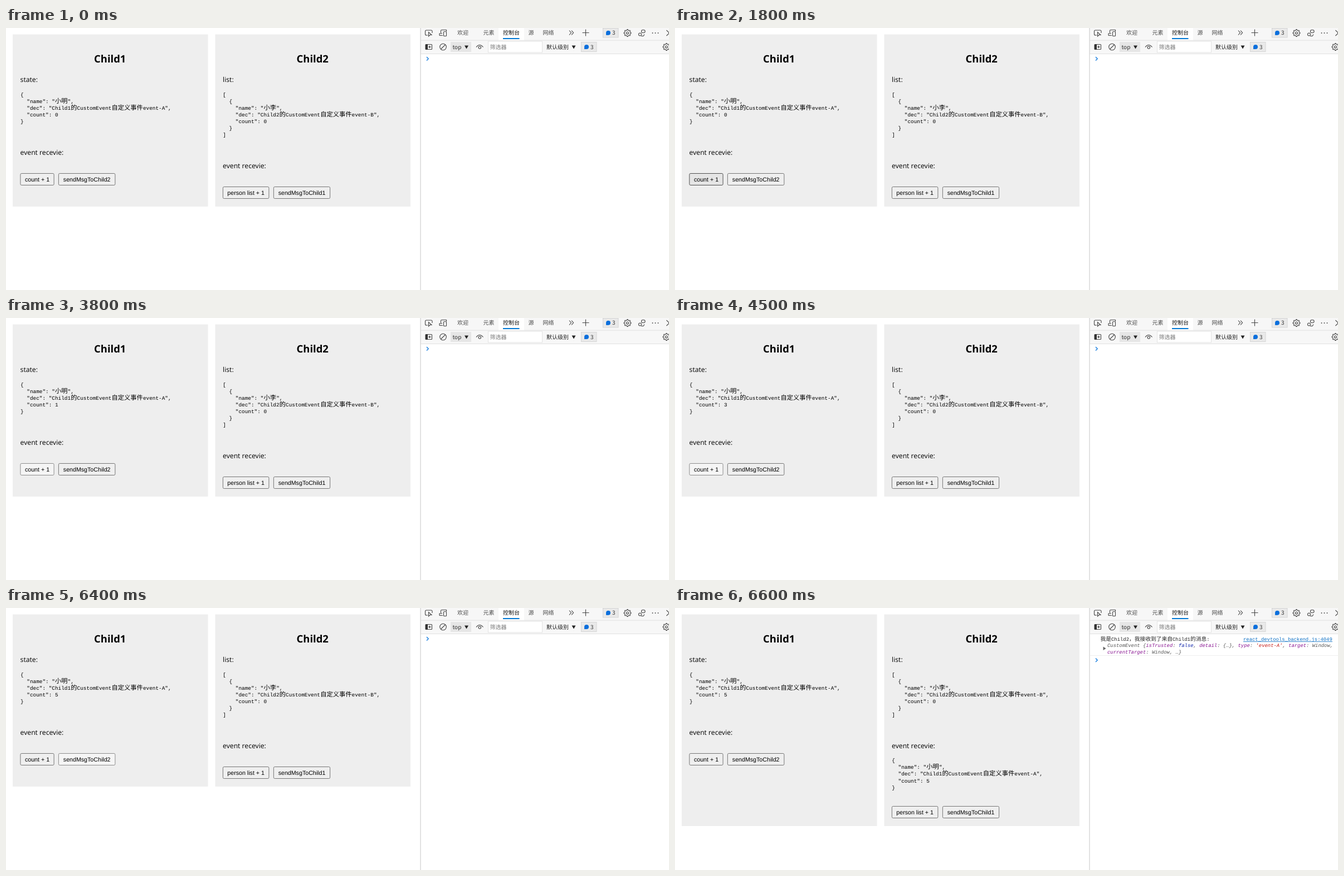
An HTML page for the animation above (8000 ms loop, 1190x471 px).

```html
<!DOCTYPE html>
<html lang="zh-CN">
<head>
<meta charset="utf-8">
<title>CustomEvent demo</title>
<style>
  html, body { margin: 0; width: 100%; height: 100%; overflow: hidden; background: #fff; }
  svg { display: block; width: 1190px; height: 471px; }
  text { white-space: pre; text-rendering: geometricPrecision; }
  .body { font: 12.2px "Open Sans", "Noto Sans", sans-serif; }
  .title { font: 700 18.4px "Open Sans", "Noto Sans", sans-serif; text-anchor: middle; }
  .button { font: 10.67px "Liberation Sans", Arial, sans-serif; text-anchor: middle; }
  .mono { font-family: "Liberation Mono", monospace; }
  .cjk { font-family: "Noto Sans CJK SC", "Noto Sans CJK", sans-serif; }
  .ui { font: 10px "Noto Sans CJK SC", "Noto Sans CJK", sans-serif; fill: #4b4b4b; }
  .icon { fill: none; stroke: #444; stroke-width: 1.1; }
</style>
</head>
<body>
<svg id="stage" viewBox="0 0 1190 471" xmlns="http://www.w3.org/2000/svg"></svg>
<script>
const LOOP = 8000;
const stage = document.getElementById('stage');

function add(tag, attrs, parent = stage, content) {
  const node = document.createElementNS('http://www.w3.org/2000/svg', tag);
  for (const key in attrs) node.setAttribute(key, attrs[key]);
  if (content !== undefined) node.textContent = content;
  return parent.appendChild(node);
}
const group = (parent = stage) => add('g', {}, parent);
const rect = (x, y, width, height, fill, parent, extra) =>
  add('rect', { x, y, width, height, fill, ...extra }, parent);
const path = (d, attrs = { class: 'icon' }, parent) => add('path', { d, ...attrs }, parent);
const label = (cls, x, y, text, parent, extra) =>
  add('text', { class: cls, x, y, ...extra }, parent, text);

// Monospaced text on a column grid; wide characters take their own advance.
function mono(x, y, text, unit, wide, parent, extra = {}) {
  const node = add('text', { y, ...extra }, parent);
  for (const run of text.match(/[\u3000-\uffef]+|[^\u3000-\uffef]+/g)) {
    const isWide = /[\u3000-\uffef]/.test(run);
    add('tspan', {
      x, class: isWide ? 'cjk' : 'mono', 'font-size': isWide ? wide : unit / 0.6
    }, node, run);
    x += run.length * (isWide ? wide : unit);
  }
  return x;
}

function json(x, y, value, parent) {
  JSON.stringify(value, null, 2).split('\n').forEach((line, i) =>
    mono(x, y + i * 12.1, line, 5.64, 11.28, parent));
}

const person = (name, child, event, count) =>
  ({ name, dec: `Child${child}的CustomEvent自定义事件event-${event}`, count });

function button(x, y, width, text, parent) {
  const box = rect(x + 0.4, y + 0.5, width - 0.8, 21, '#efefef', parent, { rx: 2 });
  label('button', x + width / 2, y + 14.6, text, parent);
  return box;
}

function panel(x, title, caption, receiveY) {
  const box = rect(x, 11.5, 350.5, 309.5, '#eee');
  label('title', x + 174.7, 62, title);
  label('body', x + 13.6, 97, caption);
  label('body', x + 13.6, receiveY, 'event recevie:');
  return box;
}

// Page
rect(0, 0, 1190, 471, '#fff');
const panels = [panel(12, 'Child1', 'state:', 228), panel(375.5, 'Child2', 'list:', 252)];
const counter = [0, 1, 2, 3, 4, 5].map(n => {
  const g = group();
  json(26, 122.6, person('小明', 1, 'A', n), g);
  return g;
});
json(389.3, 122.6, [person('小李', 2, 'B', 0)]);
const received = group();
json(389.3, 277.2, person('小明', 1, 'A', 5), received);
const lowerButtons = group();
const buttons = {
  count: button(25.5, 261, 61, 'count + 1'),
  send2: button(94, 261, 102.3, 'sendMsgToChild2'),
  person: button(389, 285, 83.3, 'person list + 1', lowerButtons),
  send1: button(480, 285, 102, 'sendMsgToChild1', lowerButtons)
};

// Developer tools
rect(744, 0, 446, 46, '#f7f7f7');
rect(743.5, 0, 1, 471, '#c6c6c6');
rect(744, 21.7, 446, 0.8, '#dadada');
rect(744, 46, 446, 0.8, '#dadada');
rect(884, 0, 46, 21.7, '#fff');
rect(892, 18, 29.5, 2, '#0078d4');
[[810, '欢迎'], [856.5, '元素'], [892, '控制台'], [937.5, '源'], [963.5, '网络']]
  .forEach(([x, text]) => label('ui', x, 12.4, text, stage, x === 892 ? { style: 'fill:#111' } : {}));

function gear(cx, cy) {
  let d = '';
  for (let i = 0; i < 32; i++) {
    const a = (i - 0.5) * Math.PI / 16;
    const r = i % 4 < 2 ? 6.4 : 4.9;
    d += `${i ? 'L' : 'M'}${(cx + r * Math.cos(a)).toFixed(2)} ${(cy + r * Math.sin(a)).toFixed(2)}`;
  }
  path(d + 'Z');
  add('circle', { class: 'icon', cx, cy, r: 2 });
}
function badge(x, y, height) {
  rect(x + 0.5, y + 0.5, 27.5, height, '#e9e9e9', stage, { stroke: '#d0d0d0', 'stroke-width': 0.8 });
  const cy = y + 0.5 + height / 2;
  add('circle', { cx: x + 10, cy, r: 4, fill: '#0b6fdc' });
  path(`M${x + 6} ${cy}v4h4z`, { fill: '#0b6fdc' });
  label('ui', x + 17, cy + 3.6, '3', stage, { style: 'fill:#333' });
}

path('M757 13h-2.5q-2 0-2-2v-5q0-2 2-2h8.500q2 0 2 2v3M758.500 7.500v7.300l2.300-2.300h3.200z');
path('M780.500 9V5q0-1.500 1.500-1.500h8.500V6M778 13.500h6M778 13.500v-3.500h5');
rect(785.5, 6.5, 5, 8, 'none', stage, { class: 'icon', rx: 1 });
path('M1011 4.500l3.500 4-3.500 4M1015 4.500l3.500 4-3.500 4');
path('M1034.500 8.500h12M1040.500 2.500v12', { class: 'icon', 'stroke-width': 1.3 });
badge(1071, 0, 16.5);
gear(1115.5, 9);
rect(1140.5, 3.5, 6.5, 5, 'none', stage, { class: 'icon', rx: 2.2 });
add('circle', { class: 'icon', cx: 1138, cy: 11.5, r: 2.5 });
path('M1140 14.500h4l2-3');
[1160.5, 1165.5, 1170.5].forEach(cx => add('circle', { cx, cy: 9, r: 0.9, fill: '#444' }));
path('M1185.500 4l5 5-5 5');

rect(753, 29.5, 11.5, 9, 'none', stage, { class: 'icon', rx: 1 });
rect(753, 29.5, 4, 9, '#333');
path('M763 34h-4M761 32l-2 2 2 2');
add('circle', { class: 'icon', cx: 784.5, cy: 34, r: 5.8 });
path('M780.500 38l8-8');
rect(798, 25, 37, 18, '#e6e6e6');
label('ui', 801.5, 37.7, 'top', stage, { style: 'fill:#333' });
const caret = x => path(`M${x} 31.500h7l-3.500 6z`, { fill: '#222' });
caret(823);
path('M844 34.500q6-8 12.500 0');
add('circle', { class: 'icon', cx: 850.3, cy: 35, r: 2.2 });
rect(865.5, 24, 97, 20, '#fff', stage, { stroke: '#ddd', 'stroke-width': 0.8 });
label('ui', 868.5, 37.6, '筛选器', stage, { style: 'fill:#757575' });
label('ui', 970, 37.6, '默认级别', stage, { style: 'fill:#222' });
caret(1015.5);
badge(1032, 25, 17);
gear(1185.5, 34);

// Console
const prompt = path('M755 52l3.200 3.200-3.200 3.200', { fill: 'none', stroke: '#1a7fe0', 'stroke-width': 1.4 });
const log = group();
const UNIT = 5.33;
mono(763.5, 59.2, '我是Child2，我接收到了来自Child1的消息:', UNIT, 9.75, log, { fill: '#222' });
mono(1020, 58.8, 'react_devtools_backend.js:4049', UNIT, 9.75, log, { fill: '#0b6fc4' });
rect(1020, 60, 160, 0.8, '#0b6fc4', log);
path('M768.500 69.500v6.500l5-3.250z', { fill: '#666' }, log);

function preview(y, parts) {
  let x = 776;
  for (const [text, fill] of parts) {
    x = mono(x, y, text, UNIT, 9.75, log, { fill, 'font-style': 'italic' });
  }
}
const KEY = '#881391', PLAIN = '#555';
preview(70.2, [
  ['CustomEvent {', PLAIN], ['isTrusted', KEY], [': ', PLAIN], ['false', '#0d22aa'], [', ', PLAIN],
  ['detail', KEY], [': {…}, ', PLAIN], ['type', KEY], [': ', PLAIN], ["'event-A'", '#c41a16'],
  [', ', PLAIN], ['target', KEY], [': Window,', PLAIN]
]);
preview(81.7, [['currentTarget', KEY], [': Window, …}', PLAIN]]);
rect(744.5, 85, 445.5, 0.8, '#ececec', log);

// Pointer activity
const countClicks = [3200, 3800, 4100, 4500, 4800];
const RELEASE = 100, SEND = 6400, RECEIVED = 6500, LOGGED = 6600;
const hovers = [
  ['send1', 500, 800], ['person', 800, 1000], ['send2', 1400, 1700], ['count', 1800, 2100],
  ['count', 2800, 6000], ['send2', 6100, LOGGED]
];
const looks = {
  normal: ['#efefef', '#767676'],
  hover: ['#e5e5e5', '#4f4f4f'],
  active: ['#f5f5f5', '#8d8d8d']
};
const show = (node, visible) => node.setAttribute('visibility', visible ? 'visible' : 'hidden');

function update(t) {
  const isDown = start => t >= start && t < start + RELEASE;
  const hovered = (hovers.find(([, from, to]) => t >= from && t < to) || [])[0];
  const pressed = countClicks.some(isDown) || isDown(SEND);
  for (const name in buttons) {
    const [fill, stroke] = looks[name !== hovered ? 'normal' : pressed ? 'active' : 'hover'];
    buttons[name].setAttribute('fill', fill);
    buttons[name].setAttribute('stroke', stroke);
  }

  const count = countClicks.filter(start => t >= start + RELEASE).length;
  counter.forEach((node, n) => show(node, n === count));

  const hasMessage = t >= RECEIVED;
  panels.forEach(box => box.setAttribute('height', hasMessage ? 380.5 : 309.5));
  lowerButtons.setAttribute('transform', `translate(0 ${hasMessage ? 71 : 0})`);
  show(received, hasMessage);

  const hasLog = t >= LOGGED;
  show(log, hasLog);
  prompt.setAttribute('transform', `translate(0 ${hasLog ? 38.5 : 0})`);
}

const begin = performance.now();
function frame() {
  update((performance.now() - begin) % LOOP);
  requestAnimationFrame(frame);
}
frame();
</script>
</body>
</html>
```
